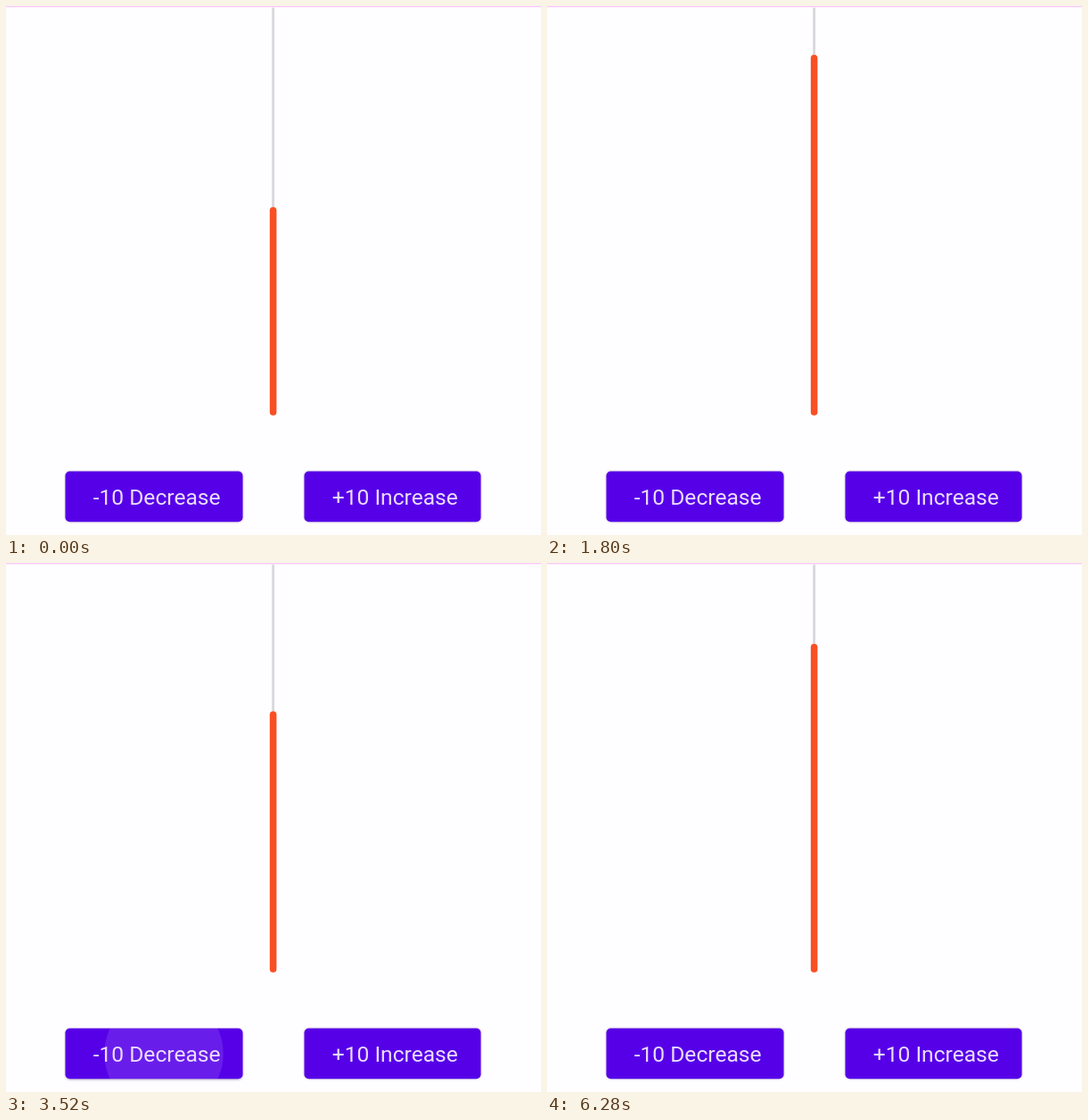
Recreate the animation shown at these times as an HTML page. Size 600 px wide and 594 px high, loop 6.32 s.

```html
<!DOCTYPE html>
<html lang="en">
<head>
<meta charset="utf-8">
<style>
  html, body { margin: 0; width: 100%; height: 100%; overflow: hidden; background: #fefdff; }
  svg { display: block; width: 600px; height: 594px; }
  text { font: 24.6px Roboto, sans-serif; fill: #eadcfc; }
</style>
</head>
<body>
<svg viewBox="0 0 600 594">
  <rect width="600" height="1.3" fill="#fbc6f9"/>
  <line x1="299.6" x2="299.6" y1="3" y2="440" stroke="#dad9de" stroke-width="3" stroke-linecap="round"/>
  <line id="bar" x1="299.6" x2="299.6" y2="456" stroke="#f94f24" stroke-width="7.6" stroke-linecap="round"/>
  <g id="buttons"></g>
</svg>
<script>
const LOOP = 6320, STEP = 40;

// Bar top as [time, y], joined by a smooth monotone curve
const path = [[0, 226], [640, 195.5], [720, 191], [1280, 139], [1800, 55], [1920, 38.5],
  [1980, 37.5], [2560, 48.5], [2800, 69.5], [3200, 120], [3840, 209], [4150, 234.5],
  [4320, 232], [5000, 179], [5120, 167], [5760, 108], [6280, 91]];

const buttons = [
  { x: 66.5, w: 199, textX: 97.7, label: "-10 Decrease", presses: [1860, 2240, 2620, 3060, 3480] },
  { x: 334.5, w: 198, textX: 365.7, label: "+10 Increase", presses: [540, 960, 1340, 3980, 4540, 5030] }
];

const clamp = v => Math.max(0, Math.min(1, v));
const slope = i => (path[i + 1][1] - path[i][1]) / (path[i + 1][0] - path[i][0]);

function tangent(i) {
  if (i === 0) return slope(0);
  if (i === path.length - 1) return slope(i - 1);
  const a = slope(i - 1), b = slope(i);
  return a * b <= 0 ? 0 : 2 * a * b / (a + b);
}

function barTop(t) {
  let i = 0;
  while (i < path.length - 2 && t > path[i + 1][0]) i++;
  const [t0, y0] = path[i], [t1, y1] = path[i + 1];
  const d = t1 - t0, u = clamp((t - t0) / d), v = 1 - u;
  return v * v * (1 + 2 * u) * y0 + u * u * (3 - 2 * u) * y1
    + d * u * v * (v * tangent(i) - u * tangent(i + 1));
}

const group = document.getElementById("buttons");
group.innerHTML = buttons.map((b, i) => {
  const box = `x="${b.x}" y="522.6" width="${b.w}" height="56.6" rx="5"`;
  return `<clipPath id="clip${i}"><rect ${box}/></clipPath>
    <rect class="face" ${box} fill="#5600e8"/>
    <circle class="ripple" cx="${b.x + b.w / 2 + 11}" cy="551" fill="#fff" clip-path="url(#clip${i})"/>
    <text x="${b.textX}" y="560">${b.label}</text>`;
}).join("");
const faces = group.querySelectorAll(".face");
const ripples = group.querySelectorAll(".ripple");
const bar = document.getElementById("bar");

function drawButton(b, i, t) {
  const age = t - (b.presses.findLast(p => p <= t) ?? -LOOP);
  const lift = clamp(age / 100) * clamp((340 - age) / 100);
  const alpha = 0.21 * clamp(age / 75) * clamp((430 - age) / 170);
  faces[i].style.filter =
    `drop-shadow(0 ${0.6 + lift}px ${1 + 0.8 * lift}px rgba(40,20,70,${0.3 + 0.1 * lift}))`;
  ripples[i].setAttribute("r", 30 + 88 * Math.sqrt(clamp(age / 230)));
  ripples[i].setAttribute("opacity", alpha);
}

const start = performance.now();

function draw() {
  const t = Math.floor((performance.now() - start) % LOOP / STEP) * STEP;
  bar.setAttribute("y1", barTop(t) + 3.5);
  buttons.forEach((b, i) => drawButton(b, i, t));
  requestAnimationFrame(draw);
}
draw();
</script>
</body>
</html>
```
